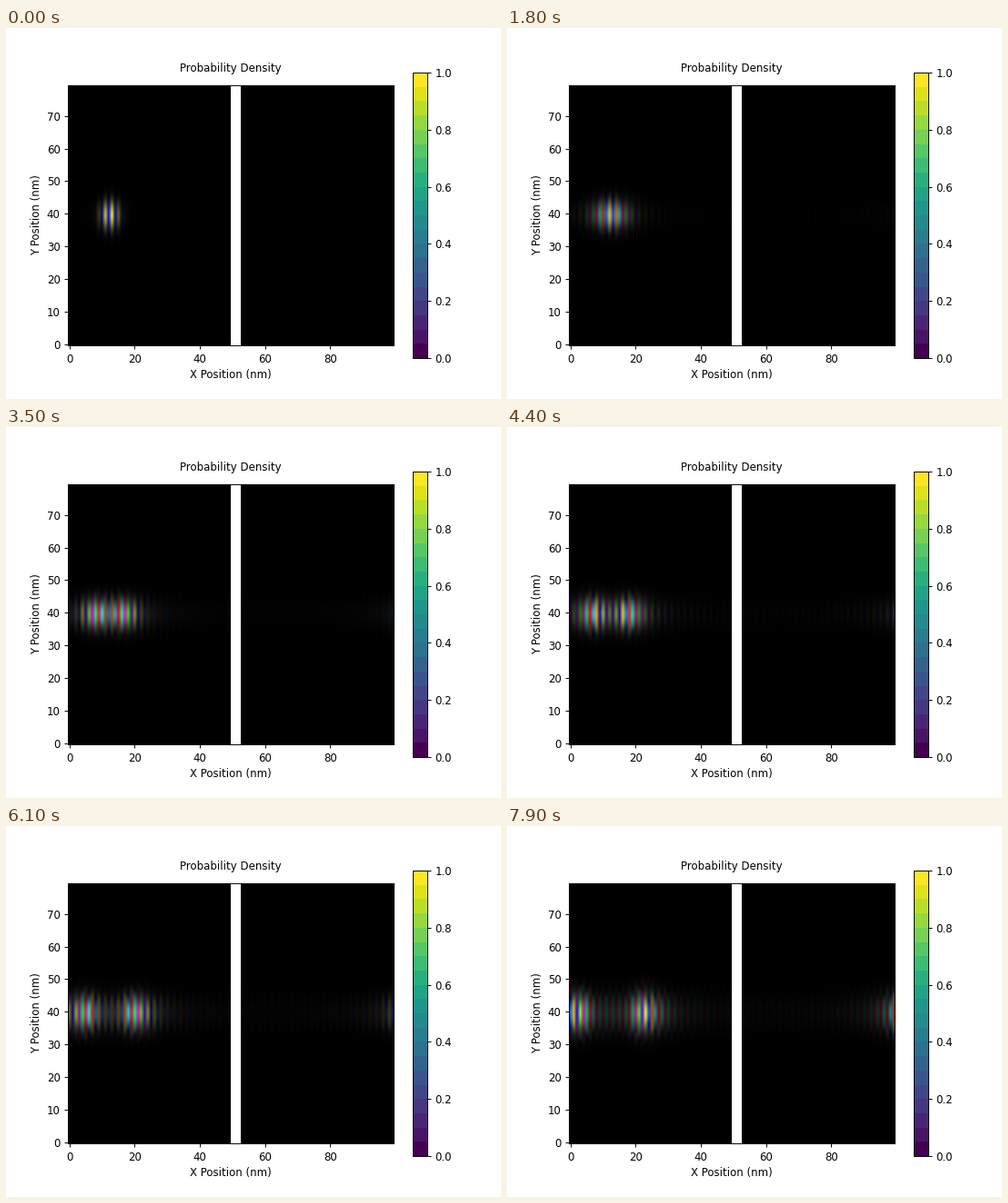
These frames come from a looping animation (544x408 px, 8000 ms). A matplotlib script:

```python
import numpy as np
import matplotlib.pyplot as plt
from matplotlib.animation import FuncAnimation
from matplotlib.cm import ScalarMappable
from matplotlib.colors import Normalize, hsv_to_rgb

NX, NY = 100, 80
FRAMES, INTERVAL = 80, 100
START = 2                      # steps already evolved when the loop begins
X0, Y0 = 12.35, 39.5           # packet centre in cells
WX, WY = 2.83, 4.1             # packet half-widths in cells
CX, CY = 0.0475, 0.096         # dispersion per step along each axis
PHASE = np.radians(260)

x, y = np.arange(NX), np.arange(NY)
kx = 2 * np.pi * np.fft.fftfreq(NX)
ky = 2 * np.pi * np.fft.fftfreq(NY)

# The carrier sits at the Nyquist wave number, so the packet splits in two.
spec_x = np.fft.fft(np.exp(-((x - X0) / WX) ** 2) * (-1.0) ** x)
spec_y = np.fft.fft(np.exp(-((y - Y0) / WY) ** 2))


def evolve(spec, k, c, t):
    """Free evolution of one separable factor."""
    return np.fft.ifft(spec * np.exp(-0.5j * c * k ** 2 * t))


def wave(t):
    psi = np.outer(evolve(spec_y, ky, CY, t), evolve(spec_x, kx, CX, t))
    return psi * np.exp(1j * PHASE)


def colorize(psi):
    """Phase as hue, magnitude as brightness."""
    mag = np.abs(psi)
    hue = np.angle(psi) / (2 * np.pi) % 1.0
    return hsv_to_rgb(np.dstack([hue, np.ones_like(hue), mag / mag.max()]))


fig, ax = plt.subplots(figsize=(6.4, 4.8), dpi=85)
image = ax.imshow(colorize(wave(START)), origin="lower", interpolation="bilinear")
ax.autoscale(False)
ax.axvspan(49.5, 52.5, facecolor="white", edgecolor="none", lw=0)
ax.set_xticks(range(0, 100, 20))
ax.set_yticks(range(0, 80, 10))
ax.set_xlabel("X Position (nm)")
ax.set_ylabel("Y Position (nm)")
ax.text(0.5, 1.05, "Probability Density", transform=ax.transAxes, ha="center")

scale = ScalarMappable(Normalize(0, 1), plt.get_cmap("viridis", 20))
fig.colorbar(scale, ax=ax, fraction=0.1, ticks=np.linspace(0, 1, 6))


def update(i):
    image.set_data(colorize(wave(START + i)))
    return [image]


anim = FuncAnimation(fig, update, frames=FRAMES, interval=INTERVAL,
                     repeat=True, repeat_delay=0)
plt.show()
```
